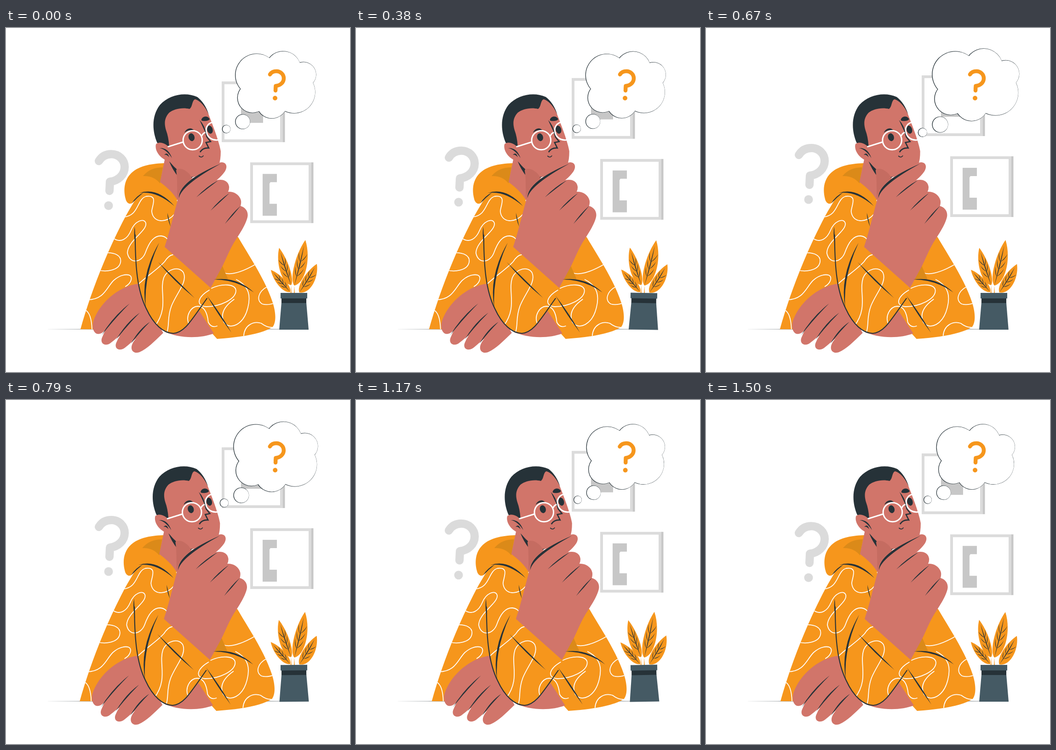
An HTML page for the animation above (1.54 s loop, 748 by 748 pixels).

```html
<!DOCTYPE html>
<html lang="en">
<head>
<meta charset="utf-8">
<title>Thinking</title>
<style>
  html, body { margin: 0; width: 100%; height: 100%; overflow: hidden; background: #fff; }
  svg { display: block; width: 100vw; height: 100vh; }
  .o { fill: #f6961c; } .d { fill: #263238; } .s { fill: #d1756a; }
  .g { fill: #dbdbdb; } .k { fill: #c7c7c7; } .w { fill: #fff; } .p { fill: #455a64; }
  .line { fill: none; stroke-linecap: round; stroke-linejoin: round; }
  .ink { stroke: #263238; } .white { stroke: #fff; }
</style>
</head>
<body>
<svg viewBox="0 0 748 748" xmlns="http://www.w3.org/2000/svg">
  <defs>
    <path id="body" d="M162 655C180 590 211 505 252 425C268 393 283 372 298 345L370 375L505 455C530 498 564 548 580 597C588 622 587 641 580 650C560 663 520 672 459 676L440 655Z"/>
    <path id="arm" d="M281 432C281 500 282 565 305 610C320 645 343 664 364 664C385 663 400 643 443 583L447 564L340 470Z"/>
    <clipPath id="inBody"><use href="#body"/></clipPath>
    <clipPath id="inArm"><use href="#arm"/></clipPath>
    <g id="swirls" class="line white" stroke-width="1.8">
      <path d="M256 411C290 408 284 372 305 366C332 362 317 388 317 399C320 425 350 424 365 406"/>
      <path d="M232 456C250 470 265 457 272 440C280 420 300 412 304 424C308 441 265 462 264 489C269 515 295 510 303 489C312 464 322 452 337 452C348 453 351 459 354 463"/>
      <path d="M212 489C239 487 252 496 249 510C245 528 216 531 200 526"/>
      <path d="M178 591C214 590 218 565 234 549C252 533 277 532 272 548Q270 556 260 562"/>
      <path d="M172 613Q186 620 187 655"/>
      <path d="M286 559C305 540 330 525 345 508Q354 494 363 493"/>
      <path d="M324 648C355 607 333 573 343 543C352 523 377 517 386 532C395 552 372 575 360 604C350 630 356 645 350 662"/>
      <path d="M397 642C391 626 401 606 417 605C432 605 438 620 440 640Q447 653 459 648"/>
      <path d="M442 570C418 584 411 603 435 606C465 606 500 590 500 571C499 556 470 555 447 566"/>
      <path d="M501 547C530 562 532 584 526 608C517 645 488 658 474 640Q462 614 496 590"/>
      <path d="M468 525C474 541 505 536 544 513"/>
      <path d="M569 562C548 573 544 592 557 600Q569 604 587 597"/>
      <path d="M517 669C519 645 539 637 555 642Q571 654 584 650"/>
    </g>
  </defs>

  <path class="d" d="M82 655L374 654.3L666 655L374 655.8Z"/>

  <g id="float">
    <path class="k" d="M511 150H559V206H511Z"/>
    <g id="frames"></g>
    <path class="k" d="M511 150H559V206H511ZM558 317H589V335H575L573 338V382H589V408H558Z"/>
    <path class="line" stroke="#dbdbdb" stroke-width="18" d="M202 289C208 279 217 274 229 274C246 274 258 287 258 302C258 319 244 332 226 334L225 354"/>
    <circle class="g" cx="223" cy="386" r="9.500"/>
  </g>

  <g id="plant">
    <g id="leaves"></g>
    <path class="p" d="M599 597H653L658 656H594Z"/>
    <path class="d" d="M599 587H653V598H599Z"/><path class="p" d="M597 576H655V588H597Z"/>
  </g>

  <g id="bubble"></g>
  <g id="mark">
    <path class="line" stroke="#f6961c" stroke-width="8.500" d="M574 101C577 96 582 94 588 94C597 94 604 101 604 109.500C604 118 597 125 586.500 126L586 136"/>
    <circle class="o" cx="585" cy="152.500" r="5"/>
  </g>

  <g id="man">
    <use href="#body" class="o"/>
    <use href="#swirls" clip-path="url(#inBody)"/>
    <path class="s" d="M335 652L418 612L452 664C422 676 375 675 345 660Z"/>
    <path class="s" d="M189 642C198 605 240 562 288 556L305 600L342 663C322 682 308 697 290 705C278 709 270 701 274 689Q277 681 283 675C272 683 264 692 256 697C244 703 235 696 240 684Q243 676 248 669C240 674 232 682 226 686C214 693 204 685 209 673L216 657Q209 664 203 665C193 667 187 656 189 642Z"/>
    <use href="#arm" class="o"/>
    <use href="#swirls" clip-path="url(#inArm)"/>
    <path fill="#db8a19" d="M469 514L483 546L452 546Z"/>

    <path class="o" d="M348 294C320 294 290 299 273 315C257 330 255 352 260 371C262 381 269 384 274 381L298 358C325 356 346 371 365 387L374 371Z"/>
    <path fill="#db8a19" d="M298 322C309 308 325 303 341 303L335 338C326 326 313 321 298 322Z"/>
    <path class="s" d="M346 282L335 335C350 346 363 358 372 373L405 326L362 290Z"/>
    <path class="d" d="M355 290Q362 308 374 323L371 306ZM383 312L409 323L401 327Z"/>

    <path class="s" d="M337 200C345 160 390 146 416 153C430 162 436 175 441 189C454 222 464 250 467 268Q467 288 463 296C440 312 422 323 403 324C382 318 362 303 350 280Z"/>
    <path class="d" d="M329 250C317 222 317 190 335 167C355 145 390 138 416 150Q433 163 441 188C433 170 421 157 411 155C404 158 406 172 399 176C384 172 365 176 355 184C344 196 344 208 348 222Q354 238 355 260Q341 249 329 250Z"/>
    <path class="s" d="M326 253C332 246 347 249 357 262L360 289C345 292 322 272 326 253Z"/>

    <g class="d">
      <ellipse cx="403.500" cy="237.500" rx="6.500" ry="8.500" transform="rotate(-16 403.500 237.500)"/>
      <ellipse cx="443.500" cy="221" rx="6" ry="9" transform="rotate(-16 443.500 221)"/>
      <path d="M425 199C427 192 438 189 443 198C441 203 428 203 425 201ZM388 228C392 217 404 215 409 223Q396 220 388 228Z"/>
    </g>
    <path class="ink" fill="none" stroke-width="2.600" d="M434 226L437 237L445 247L435 249L441 261Q428 260 422 270"/>
    <path class="line ink" stroke-width="1.800" d="M420 278.500Q425 283 429 278"/>
    <g class="line white" stroke-width="3">
      <circle cx="406" cy="244" r="20.800"/>
      <path d="M353 258L385 248M426 234Q431 225 437 228M453 204.500C440 205 433 216 436 227C439 239 450 246 464 243"/>
    </g>

    <path fill="#c56c61" d="M370 309C374 304 384 306 391 311Q401 317 404 327L386 350L374 390C371 360 374 333 370 309Z"/>
    <path class="s" d="M345 476C355 447 366 400 374 372C376 350 390 336 410 324C430 308 455 292 470 292C480 293 482 302 476 312Q469 322 458 331C471 328 483 332 485 344Q486 350 483 356C495 355 508 362 511 375Q512 381 510 387C521 390 528 400 525 412C521 428 509 446 500 460C486 481 477 507 468 523L445 565Z"/>
    <path id="creases" class="d"/>
    <path class="line ink" stroke-width="2.100" d="M281 450C281 520 286 572 305 610C321 645 343 664 364 664C388 662 400 640 437 588"/>
  </g>
</svg>
<script>
const $ = id => document.getElementById(id);
const LOOP = 1540, STEP = LOOP / 37, BEAT = 1500;

// A stroke along a quadratic curve, thin at both ends.
function taper([x0, y0], [cx, cy], [x1, y1], w) {
  const len = Math.hypot(x1 - x0, y1 - y0);
  const nx = (y0 - y1) / len * w, ny = (x1 - x0) / len * w;
  return `M${x0} ${y0}Q${cx + nx} ${cy + ny} ${x1} ${y1}Q${cx - nx} ${cy - ny} ${x0} ${y0}Z`;
}

function pictureFrame(x, y) {
  const box = (kind, dx, dy, w, h) =>
    `<rect class="${kind}" x="${x + dx}" y="${y + dy}" width="${w}" height="${h}"/>`;
  return box('g', 0, 0, 134, 132) + box('k', 133, 0, 4.5, 132) + box('w', 6, 6, 121, 120);
}

// A leaf bulging `l` to its left and `r` to its right of the midrib.
function leaf([bx, by], [tx, ty], l, r) {
  const dx = tx - bx, dy = ty - by, len = Math.hypot(dx, dy);
  const at = (f, side) => [bx + dx * f - dy / len * side, by + dy * f + dx / len * side];
  let veins = taper(at(0, 0), at(.5, (r - l) / 5), at(.88, 0), 1.8);
  for (const f of [.2, .36, .52])
    for (const side of [-l, r])
      veins += taper(at(f, 0), at(f + .06, side * .35), at(f + .2, side * .52), 1.2);
  return `<path class="o" d="M${bx - 1} 578L${at(0, 0)}C${at(.1, -l)} ${at(.65, -l)} ${at(1, 0)}` +
    `C${at(.65, r)} ${at(.1, r)} ${at(0, 0)}L${bx + 1} 578Z"/><path class="d" d="${veins}"/>`;
}

// Circles share one outline, heavy on the left and faint on the right.
function cloud(lobes) {
  const layer = (kind, shift, inset) => lobes.map(([x, y, r]) =>
    `<circle class="${kind}" cx="${x + shift}" cy="${y}" r="${r - inset}"/>`).join('');
  return layer('d', 0, 0) + layer('w', .5, .75);
}

$('frames').innerHTML = pictureFrame(469, 116) + pictureFrame(531, 292);
$('leaves').innerHTML =
  leaf([627, 560], [651, 461], 14, 22) + leaf([620, 559], [594, 478], 18, 11) +
  leaf([618, 574], [576, 526], 13, 11) + leaf([638, 575], [676, 513], 12, 21);
$('bubble').innerHTML =
  cloud([[546, 103, 45.5], [602, 90, 38], [645, 102, 27], [625, 139, 45], [578, 162, 33], [537, 151, 32]]) +
  cloud([[516.5, 201.5, 15.8]]) + cloud([[482, 217, 9]]);

// Sleeve, hood, ear and nose folds, then the finger lines of both hands.
let folds =
  taper([333, 467], [295, 540], [304, 608], 4) +
  taper([331, 509], [367, 548], [410, 587], 3) +
  taper([437, 582], [464, 622], [490, 662], 3) +
  taper([452, 547], [500, 543], [539, 575], 3.6) +
  taper([280, 432], [279, 450], [282, 475], 2.2) +
  taper([274, 381], [284, 367], [299, 358], 2.2) +
  taper([290, 359], [327, 349], [366, 387], 4) +
  taper([351, 402], [353, 416], [358, 432], 1.8) +
  taper([376, 370], [378, 338], [467, 295], 5) +
  taper([334, 261], [351, 262], [361, 283], 3) +
  taper([344, 276], [350, 271], [355, 281], 3) +
  taper([421, 200], [430, 213], [436, 232], 3);
for (let i = 0; i < 3; i++) {
  folds += taper([414 + 31 * i, 368 + 29 * i], [437 + 28 * i, 347 + 29 * i], [462 + 24 * i, 331 + 28 * i], 2.4);
  folds += taper([269 + 22 * i, 599 + 20 * i], [235 + 28 * i, 629 + 14 * i], [208 + 32 * i, 668 + 9 * i], 2.8);
}
$('creases').setAttribute('d', folds);

const smooth = u => (u = Math.min(1, Math.max(0, u)), u * u * (3 - 2 * u));

// Sideways shake: ten swings that double, hold and halve again.
function swing(i) {
  const m = Math.min(i, 10 - i);
  return m && 1.5 * (-1) ** i * Math.min(4, 2 ** (m - 1));
}
function sway(t) {
  const p = t % BEAT / BEAT * 10, i = Math.floor(p);
  return swing(i) + (swing(i + 1) - swing(i)) * smooth(p - i);
}
// Up and back down once per beat.
function rise(t) {
  const u = 1 - Math.abs(1 - t % BEAT / BEAT * 2);
  return (u + smooth(u)) / 2;
}
const pulse = (t, start, peak, end) =>
  t < peak ? smooth((t - start) / (peak - start)) : 1 - smooth((t - peak) / (end - peak));

function render(t) {
  const late = t + 20;
  const lift = .4 - 14.2 * rise(late);
  const lean = Math.sin(Math.PI * 2 * late / BEAT) - .12;
  const size = 1 + .12 * (pulse(t, -80, 170, 450) + pulse(t, 560, 690, 930));
  $('float').setAttribute('transform', `translate(0 ${lift})`);
  $('plant').setAttribute('transform', `rotate(${lean} 626 580)`);
  $('mark').setAttribute('transform', `rotate(${1.2 * Math.min(0, lean)} 588 124)`);
  $('bubble').setAttribute('transform', `translate(586 123.5) scale(${size}) translate(-586 -123.5)`);
  $('man').setAttribute('transform', `translate(${sway(late)} 0)`);
}

const begin = performance.now();
function tick() {
  const t = (performance.now() - begin) % LOOP;
  render(Math.floor((t + 4) / STEP) % 37 * STEP);
  requestAnimationFrame(tick);
}
tick();
</script>
</body>
</html>
```
